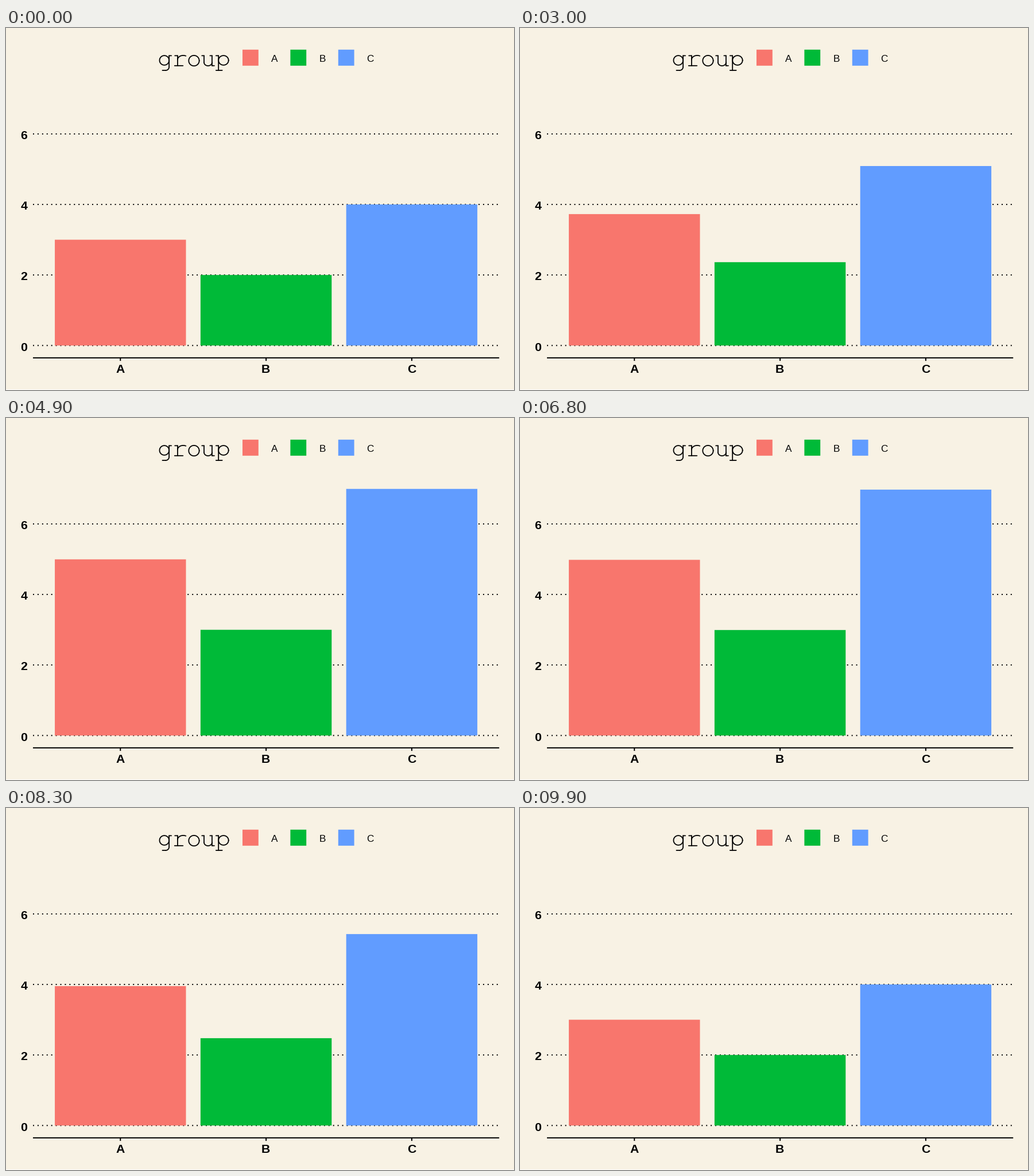
Animation, 885 px wide and 632 px high, one loop 10000 ms. Source, as a matplotlib script:

```python
import math

import matplotlib.pyplot as plt
import numpy as np
from matplotlib.animation import FuncAnimation
from matplotlib.patches import Rectangle

W, H, DPI = 885, 632, 64
PT = 72 / DPI  # points per pixel
NAMES = "ABC"
COLORS = ["#F8766D", "#00BA38", "#619CFF"]
LOW, HIGH = (3, 2, 4), (5, 3, 7)
LEFT, RIGHT = 47, 859.2
BASE, UNIT = 554.3, 61.56
SLOT = (RIGHT - LEFT) / 3.2
FRAMES, INTERVAL = 100, 100

fig = plt.figure(figsize=(W / DPI, H / DPI), dpi=DPI, facecolor="#F8F2E4")
ax = fig.add_axes([0, 0, 1, 1])
ax.axis("off")


def box(x, y, w, h, color, z=1):
    return ax.add_patch(Rectangle((x, y), w, h, fc=color, lw=0,
                                  snap=False, zorder=z))


def label(x, y, text, px, ha="center", weight="normal"):
    ax.text(x, y, text, fontsize=px * PT, family="Liberation Sans",
            weight=weight, ha=ha, va="baseline", color="black")


def y_pixel(value):
    return BASE - UNIT * value


# Thin slab-serif letters, in em units from the baseline
EM, ADVANCE, START, BASELINE = 41.6, 25, 265, 65.8
XH, DROP = 0.42, -0.195


def ink(cell, xs, ys):
    ax.plot(START + cell * ADVANCE + EM * np.array(xs),
            BASELINE - EM * np.array(ys), color="black", lw=1.8 * PT,
            solid_capstyle="round", solid_joinstyle="round", snap=False)


def stem(cell, x, y0, y1):
    ink(cell, (x, x), (y0, y1))


def slab(cell, y, x0, x1):
    ink(cell, (x0, x1), (y, y))


def arc(cell, x, y, rx, ry, a0=0, a1=360):
    a = np.radians(np.linspace(a0, a1, 60))
    ink(cell, x + rx * np.cos(a), y + ry * np.sin(a))


def draw_title():
    # g
    arc(0, 0.26, 0.225, 0.2, 0.2)
    stem(0, 0.46, XH, -0.05)
    slab(0, XH, 0.46, 0.555)
    arc(0, 0.32, -0.05, 0.14, 0.145, 0, -90)
    slab(0, DROP, 0.18, 0.32)
    # r
    stem(1, 0.215, XH, 0)
    slab(1, XH, 0.1, 0.215)
    slab(1, 0, 0.09, 0.44)
    arc(1, 0.45, 0.25, 0.235, 0.18, 180, 62)
    # o
    arc(2, 0.3, 0.21, 0.22, 0.22)
    # u
    stem(3, 0.12, XH, 0.14)
    stem(3, 0.455, XH, 0)
    slab(3, XH, 0.03, 0.12)
    slab(3, XH, 0.37, 0.455)
    slab(3, 0, 0.455, 0.55)
    arc(3, 0.2875, 0.14, 0.1675, 0.145, 180, 360)
    # p
    arc(4, 0.335, 0.225, 0.21, 0.2)
    stem(4, 0.125, XH, DROP)
    slab(4, XH, 0.02, 0.125)
    slab(4, DROP, 0.02, 0.28)


box(0, H - 1, W, 1, "white")
draw_title()

axis_y = y_pixel(-0.35)
box(LEFT, axis_y - 1, RIGHT - LEFT, 2, "black")

bars = []
for k, (name, color) in enumerate(zip(NAMES, COLORS)):
    key = 412 + 83.4 * k
    box(key, 37.8, 27.8, 28, color)
    label(key + 49.8, 59, name, 17.3, ha="left")

    center = LEFT + SLOT * (k + 0.6)
    box(center - 1, axis_y, 2, 5.3, "black")
    label(center - 0.5, 602, name, 21.3, weight="bold")
    bars.append(box(center - 0.45 * SLOT, BASE, 0.9 * SLOT, 0, color, z=3))

for value in range(0, 7, 2):
    y = y_pixel(value)
    ax.plot((LEFT, RIGHT), (y, y), color="black", lw=1.98 * PT,
            ls=(0, (1, 3)), dash_capstyle="butt", snap=False, zorder=1)
    label(37.5, y + 9.3, str(value), 21.3, ha="right", weight="bold")

ax.set_xlim(0, W)
ax.set_ylim(H, 0)


def ease(u):
    u = min(max(u, 0), 1)
    return (1 - math.cos(math.pi * u)) / 2


def update(i):
    level = ease((i - 16) / 34) - ease((i - 66) / 33)
    for bar, low, high in zip(bars, LOW, HIGH):
        top = y_pixel(low + (high - low) * level)
        bar.set_y(top)
        bar.set_height(BASE - top)
    return bars


anim = FuncAnimation(fig, update, frames=FRAMES, interval=INTERVAL,
                     repeat=True, repeat_delay=0)
plt.show()
```
